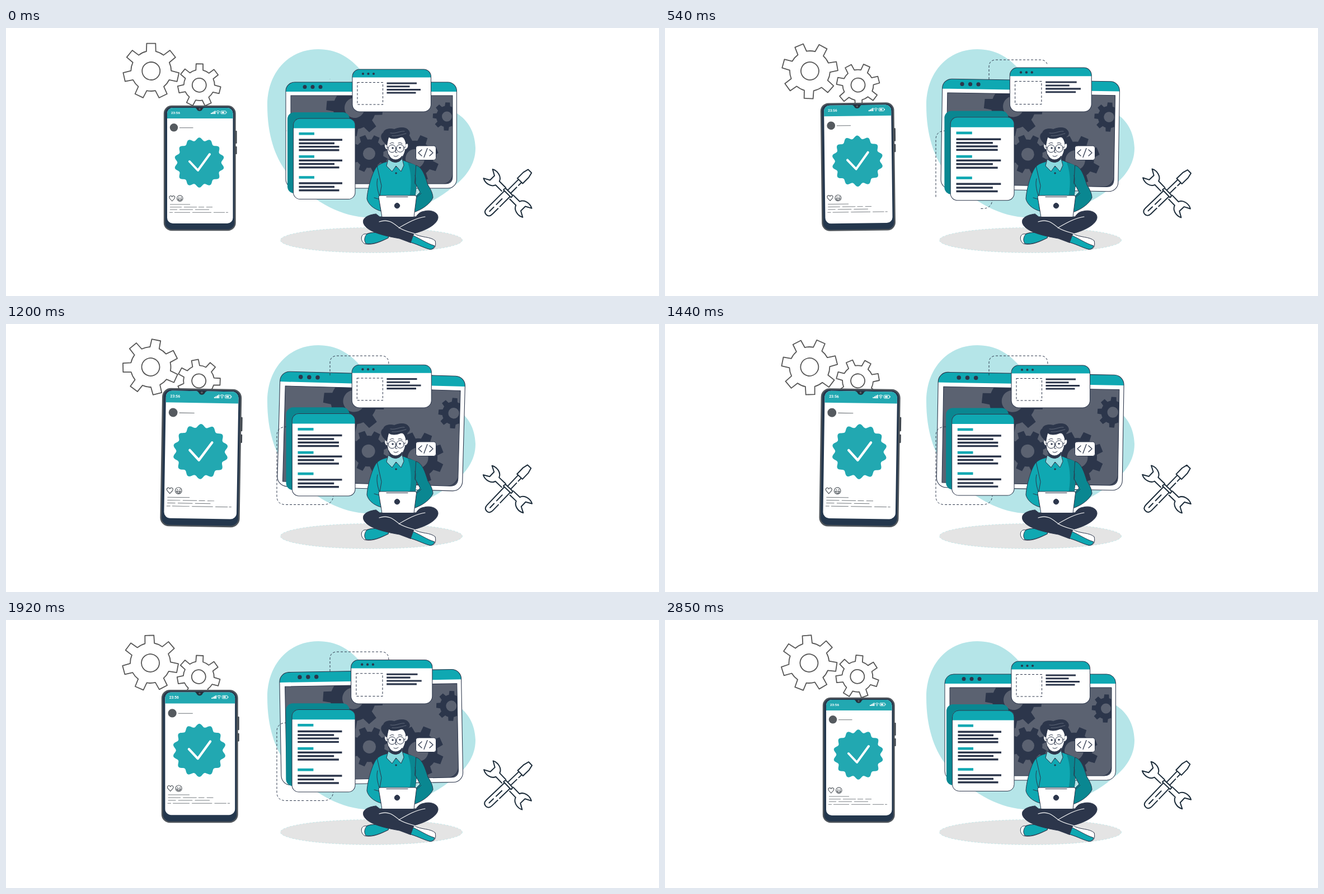
An HTML page that plays this animation: 1167x480 px, repeating every 2880 ms.

```html
<!DOCTYPE html>
<html lang="en">
<head>
<meta charset="utf-8">
<title>Developer at work</title>
<style>
html, body { margin: 0; width: 100%; height: 100%; overflow: hidden; background: #fff; }
svg { display: block; width: 100%; height: 100%; }
.ink { fill: none; stroke: #2c364b; stroke-width: 1; }
.outline { fill: none; stroke: #555; stroke-width: 1.8; stroke-linejoin: round; }
.tool { fill: none; stroke: #1c2c3a; stroke-width: 2.1; stroke-linejoin: round; stroke-linecap: round; }
.dash { fill: none; stroke: #2c364b; stroke-width: 1; stroke-dasharray: 4 3; }
.reveal { fill: none; stroke: #fff; stroke-width: 6; }
</style>
</head>
<body>
<svg id="stage" viewBox="0 0 1167 480" preserveAspectRatio="none"></svg>
<script>
const LOOP = 2880;
const TEAL = '#0fa8b2', DEEP = '#0a8791', NAVY = '#2c364b', SLATE = '#5b6271';

const polar = (r, a) => `${(r * Math.cos(a)).toFixed(2)},${(r * Math.sin(a)).toFixed(2)}`;

// Gear outline around the origin, first tooth pointing up.
function gearPath(teeth, outer, root, tipHalf, baseHalf) {
  let d = '';
  for (let i = 0; i < teeth; i++) {
    const a = -Math.PI / 2 + i * 2 * Math.PI / teeth;
    d += (i ? `A${root},${root} 0 0 1 ` : 'M') + polar(root, a - baseHalf) +
      'L' + polar(outer, a - tipHalf) + 'L' + polar(outer, a + tipHalf) + 'L' + polar(root, a + baseHalf);
  }
  return d + `A${root},${root} 0 0 1 ${polar(root, -Math.PI / 2 - baseHalf)}Z`;
}

const outlineGear = (id, outer, root, hole) => `<g id="${id}" class="outline">
  <path d="${gearPath(7, outer, root, 0.16, 0.235)}"/><circle r="${hole}"/></g>`;

const solidGear = (x, y, outer, hub, angle) => `<g transform="translate(${x} ${y}) rotate(${angle})">
  <path d="${gearPath(8, outer, outer * 0.75, 0.16, 0.25)}" fill="${NAVY}"/><circle r="${hub}" fill="${SLATE}"/></g>`;

// Scalloped disc with one bump pointing up.
function badgePath() {
  const points = [];
  for (let i = 0; i < 168; i++) {
    const a = i * 2 * Math.PI / 168;
    points.push(polar(42 - 2.8 * Math.cos(14 * a), a));
  }
  return 'M' + points.join('L') + 'Z';
}

const windowBox = (x, y, w, h, r, head) => `
  <rect x="${x}" y="${y}" width="${w}" height="${h}" rx="${r}" fill="#fff"/>
  <path d="M${x},${y + head}V${y + r}a${r},${r} 0 0 1 ${r},${-r}h${w - 2 * r}a${r},${r} 0 0 1 ${r},${r}V${y + head}Z" fill="${TEAL}"/>
  <rect class="ink" x="${x}" y="${y}" width="${w}" height="${h}" rx="${r}"/>`;

const dots = (xs, y, r) => xs.map(x => `<circle cx="${x}" cy="${y}" r="${r}" fill="${NAVY}"/>`).join('');

// Each row is [y, end x].
const bars = (x, rows, size, color) => rows.map(([y, end]) =>
  `<path d="M${x},${y}H${end}" stroke="${color}" stroke-width="${size}"/>`).join('');

const phone = `<g id="phone">
  <rect x="409" y="184" width="3.6" height="23" rx="1" fill="#3d444b"/>
  <rect x="409" y="212" width="3.6" height="14" rx="1" fill="#3d444b"/>
  <rect x="283" y="140" width="126.5" height="222" rx="13" fill="#24374d" stroke="#50565c" stroke-width="2.4"/>
  <rect x="288" y="143" width="117.5" height="207" rx="10" fill="#fff"/>
  <path d="M288,162V153a10,10 0 0 1 10,-10H395.500a10,10 0 0 1 10,10V162Z" fill="#22a8b1"/>
  <path d="M337,142.500Q340,143 341,145.500A5.500,5.500 0 0 0 351,145.500Q352,143 355,142.500Z" fill="#25303c"/>
  <circle cx="346" cy="145" r="1.7" fill="#5a6067"/>
  <text x="295" y="154" font-family="Roboto, sans-serif" font-size="6.2" font-weight="700" fill="#fff">23:56</text>
  <path d="M366,154v-2h1.800v2zM368.300,154v-3.300h1.800v3.300zM370.600,154v-4.600h1.800v4.600zM372.800,154v-5.800h1.600v5.800z" fill="#fff"/>
  <path d="M375.500,150q3.300,-2.800 6.600,0M376.800,152q2,-1.700 4,0" fill="none" stroke="#fff" stroke-width="1"/>
  <circle cx="378.800" cy="153.400" r=".8" fill="#fff"/>
  <rect x="384" y="148.700" width="9" height="5" rx="1" fill="none" stroke="#fff" stroke-width=".9"/>
  <path d="M385.500,150h4.500v2.400h-4.500zM393.500,150.200h1v2h-1z" fill="#fff"/>
  <circle cx="300" cy="178.300" r="7.200" fill="#555a5f"/>
  <path d="M310,178.700H334.500" stroke="#6d7378"/>
  <path transform="translate(345.500 241)" d="${badgePath()}" fill="#22a8b1"/>
  <path d="M328,239L343,255L364,226" fill="none" stroke="#fff" stroke-width="4" stroke-linecap="round" stroke-linejoin="round"/>
  <g fill="none" stroke="#50565c" stroke-width="1.100">
    <path d="M296.800,310L292.700,305.500C290,301.500 295,298.500 296.800,302.300C298.600,298.500 303.600,301.500 300.900,305.500Z"/>
    <circle cx="310.800" cy="305.200" r="5.300"/>
    <path d="M307.500,306h6.600q-1,3 -3.300,3t-3.300,-3zM308,303.500h2M312,303.500h2"/>
  </g>
  <path d="M293,316H329M293,320.800h21m4,0h23m3,0h10m4,0h11M293,325.300h13m4,0h24m4,0h25M292,330.300h6m3,0h28m4,0h34m4,0h20m2,0h4" stroke="#70767b" stroke-width=".9"/>
</g>`;

const screenPath = 'M509,121H798V266Q798,279 785,279H509Z';
const monitor = `<g id="monitor">
  ${windowBox(500, 97, 305.5, 190, 16, 17)}
  ${dots([534, 548, 562], 105.5, 3.5)}
  <path d="${screenPath}" fill="${SLATE}"/>
  <g clip-path="url(#screen)">
    ${solidGear(623, 143, 51, 18, 5)}
    ${solidGear(649, 225, 34, 11, 24)}
    ${solidGear(731, 234, 43, 17, 22)}
    ${solidGear(788, 158.500, 25.5, 9, 3)}
  </g>
  <path d="${screenPath}" class="ink"/>
  <path d="M798,262Q798,279 781,279Q795,277 798,262Z" fill="${NAVY}"/>
</g>`;

const card = `<g id="card">
  <rect x="503" y="151" width="111" height="145" rx="12" fill="${DEEP}"/>
  ${windowBox(513.5, 162, 110.5, 144.5, 12, 17.5)}
  ${bars(523.5, [[189.3, 551], [230.3, 551], [267.5, 551]], 4.6, TEAL)}
  ${bars(523.5, [[200.2, 601], [206.5, 587], [212.6, 595.5], [218.7, 595.5], [237.2, 601], [243.5, 587],
    [249.7, 595.5], [278, 601], [284.5, 587], [290.7, 595.5]], 3.4, NAVY)}
</g>`;

const popup = `<g id="popup">
  ${windowBox(619, 74, 140.5, 76, 13, 14.5)}
  ${dots([638, 647.5, 657], 82, 2.1)}
  <rect x="628" y="97.500" width="45.500" height="39.500" class="dash"/>
  ${bars(680.5, [[99, 734], [104.7, 721.5], [110.4, 741], [116, 732.5]], 3, NAVY)}
</g>`;

const man = `<g stroke="${NAVY}" stroke-width="1" stroke-linejoin="round" stroke-linecap="round">
  <rect x="732.500" y="211" width="36" height="25.500" rx="4" fill="#fff"/>
  <path d="M743,218l-6,5.500 6,5.500M747,231.500l6,-16M757,218l6,5.500 -6,5.500" fill="none" stroke-width="1.300"/>
  <path d="M683,372C670,365 652,365 644,369C634,367 632,381 641,386.500C652,389 664,386 683,376Z" fill="#fff"/>
  <path d="M683,371C670,365 654,365 645,369C641,373 639,380 643,386C656,388 666,384 683,376Z" fill="${TEAL}"/>
  <path d="M728,368C742,376 758,373 767,381C769,390 767,396 758,396.500C745,393 735,387 720,383Z" fill="#fff"/>
  <path d="M726,371C740,377 752,386 766,390C764,396 760,397 756,396C745,393 735,387 720,383Z" fill="${TEAL}"/>
  <path d="M661,333C645,335 636,341 639,350C645,366 680,373 703,377L723,384.500L729,368C749,363 771,352 772,340C773,330 759,325 748,328C740,329 736,333 733,338H668Z" fill="${NAVY}"/>
  <path d="M667,347C684,341 693,350 703,358C715,365 725,366 732,369M702,358C716,350 733,340 749,338" fill="none" stroke="#fff" stroke-width="1.100"/>
  <path d="M682,239C671,242 663,245 661,253L669,303H731L737,250C730,244 720,241 710,237Z" fill="${TEAL}"/>
  <path d="M718,241C728,243 735,246 737,252L731,303H721C725,282 725,260 718,241Z" fill="${DEEP}" stroke="none"/>
  <path d="M663,248C655,256 646,288 645,306C647,315 656,324 670,328L667,306L671,283Z" fill="${TEAL}"/>
  <path d="M733,246C744,249 749,265 754,281C760,290 763,298 763,304C758,315 744,325 729,330L731,303L740,294L731,277Z" fill="${DEEP}"/>
  <path d="M667,300C663,287 662,278 664,270M731,279Q733,270 731,264M742,296l-8,7M658,304l10,3" fill="none"/>
  <path d="M686,225V240L697,249L708,240V224Z" fill="#fff"/>
  <path d="M681,203C680,224 685,239 696,239C708,238 715,223 715,205L711,195H684Z" fill="#fff"/>
  <path d="M684,227C688,237 700,240 708,229L706,236Q697,246 687,237Z" fill="${NAVY}"/>
  <path d="M681,205C675,204 675,216 681,218M715,207C721,205 720,217 713,218" fill="#fff"/>
  <path d="M677,206C669,199 669,190 675,187C675,182 685,179 694,181.500C704,177 715,178 718,182C723,187 722,192 717,195C716,199 717,204 715,208C714,200 710,194 706,195C698,199 688,199 684,195C682,200 682,206 680,210Z" fill="${NAVY}"/>
  <path d="M687,188C697,190 704,184 712,185M690,193C701,194 709,190 715,189" fill="none" stroke="#78808e" stroke-width=".7"/>
  <circle cx="690" cy="216" r="6.800" fill="#fff"/><circle cx="704.500" cy="215.500" r="6.800" fill="#fff"/>
  <path d="M696.500,215q1,-1 1.500,0M683,214l-3,-1M711,214l3,-1M686,207q4,-3 7,-1M701,206q4,-2 7,1M697,216l-1,7h3M693,229q4,3 8,-1" fill="none"/>
  <circle cx="691" cy="215" r="1.200" fill="${NAVY}"/><circle cx="704" cy="214.500" r="1.200" fill="${NAVY}"/>
  <path d="M683,235L680,247L690,257L697,247L706,257L711,246L708,234Q698,247 683,235Z" fill="#8fdadf"/>
  <circle cx="697" cy="260" r="1.200" fill="${NAVY}"/>
  <path d="M668,300H731Q734,300 733.500,303L729,338.500H672L666,303Q666,300 668,300Z" fill="#fff"/>
  <path d="M680,302.500H718" fill="none"/>
  <circle cx="699" cy="318.300" r="4.700" fill="${NAVY}"/>
</g>`;

const wrenchHead = 'M-10,-5H-27C-30,-14 -43,-17 -52,-12L-41,-6V6L-52,12C-43,17 -30,14 -27,5H-10';
const tools = `<g id="tools"><g class="tool" transform="scale(.95)">
  <g transform="rotate(45)"><path d="${wrenchHead}"/><path d="${wrenchHead}" transform="rotate(180)"/></g>
  <g transform="rotate(-45)">
    <path d="M0,-10H-50Q-60,-9 -60,0T-50,10H0Z" fill="#fff" stroke="none"/>
    <path d="M-1,-7.500H-48Q-57,-7.500 -57,0T-48,7.500H-33M-28,7.500H-1M-1,-10Q3,-11 4,-8V8Q3,11 -1,10ZM4,-4H33M4,4H20M25,4H33M-48,0H-37M-30,0H-15"/>
    <path d="M33,-7H49L59,-4.500V4.500L49,7H33Z" fill="#fff"/>
  </g>
</g></g>`;

const frames = {
  top: 'M579,92V70Q579,57 592,57H671Q684,57 684,72',
  left: 'M502,184Q484,184 484,200V308Q484,323.500 500,323.500H535',
  right: 'M585,305Q585,323.500 567,323.500H535'
};
const frameNames = Object.keys(frames);

const stage = document.getElementById('stage');
stage.innerHTML = `<defs>
  <clipPath id="screen"><path d="${screenPath}"/></clipPath>
  ${frameNames.map(n => `<mask id="mask-${n}" maskUnits="userSpaceOnUse" x="0" y="0" width="1167" height="480">
    <path id="reveal-${n}" class="reveal" pathLength="1" d="${frames[n]}"/></mask>`).join('')}
  </defs>
  <path d="M558,38C505,38 467,80 467,138C467,205 488,245 512,271C545,305 590,335 640,339C700,340 760,318 798,285C825,265 839,242 839,215C838,185 825,165 806,153C760,128 680,125 636,78C615,52 590,38 558,38Z" fill="#b5e5e8"/>
  <ellipse cx="653" cy="380" rx="162.500" ry="22.500" fill="#e4e4e4" stroke="#b5e5e8" stroke-width=".8" stroke-dasharray="3 3"/>
  ${outlineGear('bigGear', 50, 36, 16)}${outlineGear('smallGear', 38.5, 27.5, 12.5)}
  ${phone}${monitor}
  <g id="dashes">${frameNames.map(n => `<path class="dash" d="${frames[n]}" mask="url(#mask-${n})"/>`).join('')}</g>
  ${card}${popup}${man}${tools}`;

const el = id => document.getElementById(id);
const place = (id, transform) => el(id).setAttribute('transform', transform);
const around = (x, y, scale, angle = 0) =>
  `translate(${x} ${y}) rotate(${angle}) scale(${scale}) translate(${-x} ${-y})`;
const clamp = v => Math.max(0, Math.min(1, v));

// Smooth curve through [time, value] points, level at both ends.
function track(...keys) {
  const slope = i => keys[i - 1] && keys[i + 1]
    ? (keys[i + 1][1] - keys[i - 1][1]) / (keys[i + 1][0] - keys[i - 1][0]) : 0;
  return t => {
    let i = 0;
    while (i < keys.length - 2 && keys[i + 1][0] < t) i++;
    const [t0, a] = keys[i], [t1, b] = keys[i + 1], span = t1 - t0, u = clamp((t - t0) / span);
    const u2 = u * u, u3 = u2 * u;
    return a * (2 * u3 - 3 * u2 + 1) + b * (3 * u2 - 2 * u3) +
      span * (slope(i) * (u3 - 2 * u2 + u) + slope(i + 1) * (u3 - u2));
  };
}

const phoneScale = track([0, 1], [540, 1.022], [1200, 1.103], [1680, 1.087], [1920, 1.062], [2370, 1.019], [2800, 1]);
const phoneTilt = track([0, 0], [540, -0.7], [1200, 0.95], [1680, 0.45], [1920, 0], [2370, -0.65], [2840, 0]);
const monitorScale = track([0, 1], [540, 1.037], [1200, 1.083], [1680, 1.082], [1920, 1.063], [2370, 1.035], [2850, 1]);
const monitorTilt = track([0, 0], [540, 0.9], [1200, 1.55], [1680, 0], [1920, -1], [2370, -1.1], [2850, 0]);
const cardScale = track([0, 1], [540, 1.03], [800, 1.038], [1200, 1.02], [1630, 1.002], [1920, 1.022], [2370, 1.043], [2850, 1]);

function draw(t) {
  const drift = t / LOOP;
  place('bigGear', `translate(${259.3 - 1.9 * drift} 77) rotate(${0.0525 * t})`);
  place('smallGear', `translate(${345.3 - 1.5 * drift} ${102.3 - drift}) rotate(${1 - 0.0525 * t})`);
  place('phone', around(346, 363, phoneScale(t), phoneTilt(t)));
  place('monitor', around(653, 191.5, monitorScale(t), monitorTilt(t)));
  place('card', around(624, 234, cardScale(t)));
  place('popup', around(689.3, 150, 1 + 0.0225 * (1 - Math.cos(2 * Math.PI * t / 1440))));
  place('tools', `translate(896.500 296) rotate(${1.4 * Math.sin(2 * Math.PI * t / 1600)})`);

  const leave = clamp(1 - (t - 2200) / 280);
  const grow = { top: 570, left: 800, right: 1000 };
  for (const n of frameNames)
    el('reveal-' + n).setAttribute('stroke-dasharray', `${Math.min(clamp(t / grow[n]), leave)} 2`);
  el('dashes').setAttribute('opacity', t > 0 ? leave : 0);
}

const start = performance.now();
function tick() {
  draw((performance.now() - start) % LOOP);
  requestAnimationFrame(tick);
}
draw(0);
requestAnimationFrame(tick);
</script>
</body>
</html>
```
